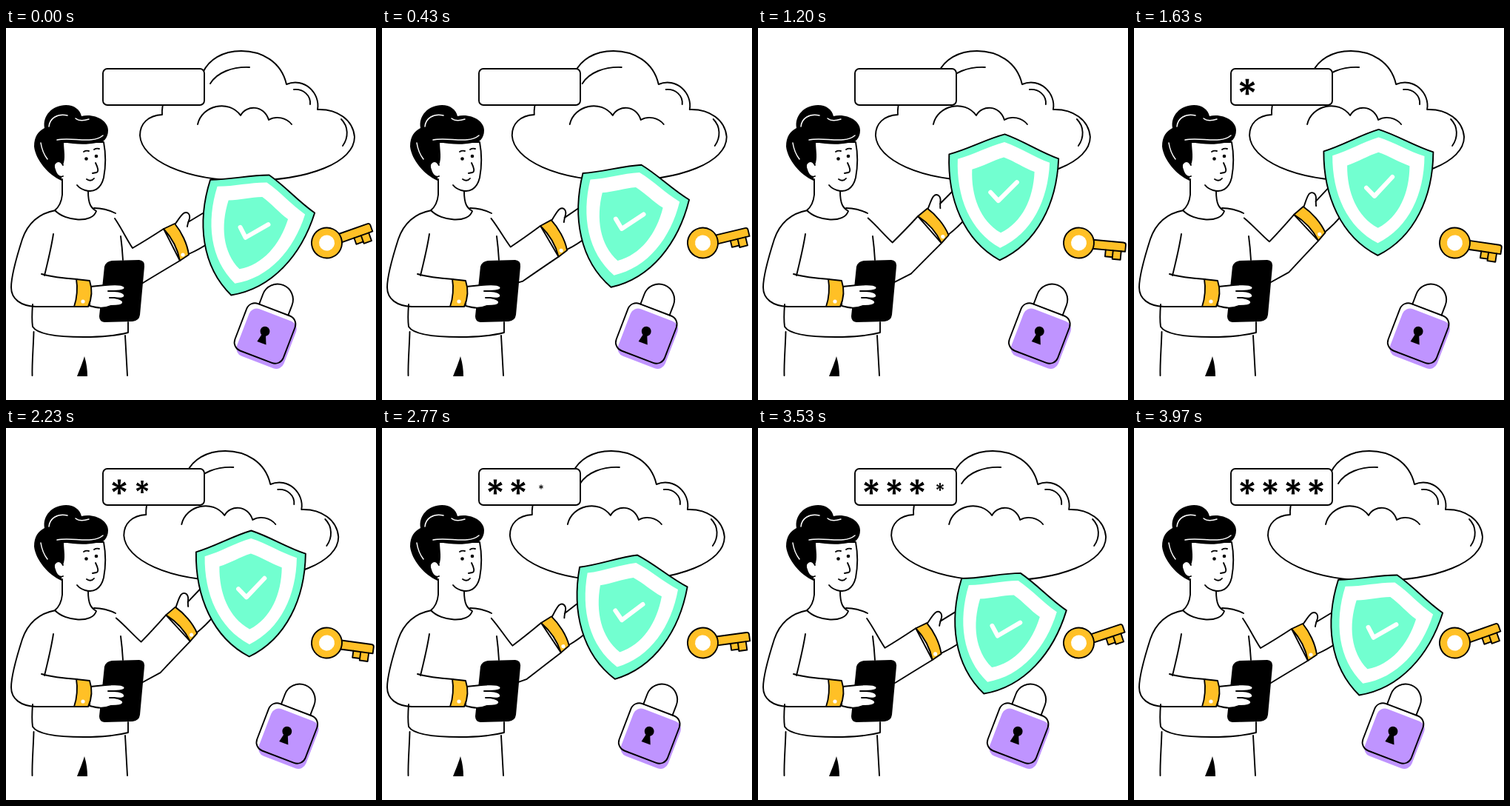
Recreate the animation shown at these times as an HTML page. Size 500 by 502 pixels, loop 4000 ms.

```html
<!DOCTYPE html>
<html>
<head>
<meta charset="utf-8">
<style>
html, body { margin: 0; width: 100%; height: 100%; overflow: hidden; background: #fff; }
svg { display: block; width: 500px; height: 502px; }
.line { fill: none; stroke: #000; stroke-width: 1.9; stroke-linecap: round; stroke-linejoin: round; }
.white { fill: #fff; }
.gold { fill: #ffc026; }
.teal { fill: #72ffd0; }
.bare { stroke: none; }
.strand { stroke: #fff; stroke-width: 1.5; }
</style>
</head>
<body>
<svg viewBox="0 0 500 502">
  <defs>
    <path id="crest" d="M-74-55C-48-63-26-77 0-85C26-77 48-63 74-55C74 5 50 60 0 85C-50 60-74 5-74-55Z"/>
    <path id="star" d="M-2.3-10H2.3L1.5-2.6L7.5-7L9.8-3L3 0L9.8 3L7.5 7L1.5 2.6L2.3 10H-2.3L-1.5 2.6L-7.5 7L-9.8 3L-3 0L-9.8-3L-7.5-7L-1.5-2.6Z"/>
  </defs>

  <g id="cloud" class="line">
    <path d="M211 117C192 118 181 129 181 145C183 178 241 206 325 206C410 206 471 181 471 147C469 124 448 109 421 110C425 88 403 66 379 76C372 45 345 31 318 31C292 31 274 43 266 60C240 62 209 85 211 117Z"/>
    <path d="M276 75C285 60 306 52 329 53M389 83C402 82 412 91 411 103M453 123C463 133 463 148 455 159"/>
    <path d="M259 130C265 104 301 96 317 118C325 103 349 104 355 124M355 124C365 118 379 121 386 130"/>
  </g>

  <g id="arm" class="line">
    <path class="white" d="M147 257C156 270 163 285 171 297Q190 286 213 271L235 314Q208 330 185 344L150 352"/>
    <path class="white" d="M229 264C232 260 236 253 240 250C245 247 249 251 248 257C246 263 245 266 245 268M246 262L266 250M247 305C256 301 264 297 274 290"/>
    <path class="gold" d="M213 271L228 264C237 275 245 291 247 306L235 314C232 298 224 283 213 271Z"/>
    <circle class="white bare" cx="239" cy="306" r="2.6"/>
  </g>

  <g class="line">
    <path d="M37.500 410C37 431 35 451 35.500 469M161 415L164 469"/>
    <path class="bare" d="M96 470C100 460 104 450 106 443C109 453 110 462 110 470Z" style="fill:#000"/>
    <path d="M36 373C35 386 35 396 36 403C42 413 70 417 105 417Q142 417 165 411V397"/>
    <path d="M67 246C45 250 30 262 22 285C14 310 7 335 7 350C7 366 20 375 40 376H92M64 278C61 298 56 317 52 334M48 332C65 337 80 338 96 339"/>
    <path d="M119 243C130 243 140 246 148 250M155 281Q157 296 158 313"/>
    <path d="M76 204V225C75 235 71 242 66 246C80 261 117 264 122 247C115 243 111 238 111 220"/>
    <path class="white" d="M77 154H132C135 170 135 186 132 202C128 218 118 222 107 219Q100 217 96 212"/>
  </g>

  <path d="M75 206C57 198 40 178 38 160C38 146 44 139 52 135C49 118 63 104 81 104C92 104 100 110 102 119C120 115 138 125 138 138C138 150 130 156 122 155C108 158 92 157 78 154C78 165 81 175 77 185C71 176 62 181 66 191Q69 198 75 200Z"/>
  <g class="line">
    <path class="white" d="M77 185C72 176 62 181 66 191C68 199 73 202 77 200"/>
    <path class="strand" d="M58 133C59 122 69 115 83 118M94 122C99 126 106 125 112 123M69 151C90 147 117 157 131 145M47 155Q49 168 56 177"/>
    <path d="M105 167Q108 165 112 166M119 164Q122 162 126 163M121 182C124 188 126 194 122 195L117 196M109 204Q115 208 119 203"/>
  </g>
  <circle cx="108.500" cy="176.500" r="2.300"/>
  <circle cx="122" cy="173" r="2.300"/>

  <path d="M143 314L180 313Q188 314 187 322L181 387Q180 395 171 396L133 397Q126 396 126 389L133 322Q135 315 143 314Z"/>
  <g class="line">
    <path class="white" d="M114 349L134 347C144 346 157 346 160 349C162 353 157 355 146 355C154 355 161 358 160 362C159 365 152 365 146 364C154 365 159 368 158 371C157 375 148 375 142 375C132 379 124 378 113 375Z"/>
    <path d="M146 355L138 355M146 364H140"/>
    <path class="gold" d="M95 339L113 341C117 353 116 365 111 376H92C96 365 97 350 95 339Z"/>
    <circle class="white bare" cx="104" cy="369" r="2.600"/>
  </g>

  <g id="shield">
    <use href="#crest" class="line" style="fill:#72ffd0"/>
    <use href="#crest" class="white" transform="translate(0 -3) scale(.84)"/>
    <use href="#crest" class="teal" transform="translate(0 -3) scale(.57 .6)"/>
    <path class="line" d="M-16-6L-5 5L19-21" style="stroke:#fff;stroke-width:6"/>
  </g>

  <g id="key" class="line">
    <path class="gold" d="M19-6H60Q63.500-6 63.500-3V6H58V17.500H47V15H37V6H19Z"/>
    <path d="M37 6H58M47 6V15"/>
    <circle class="gold" r="20.500"/>
    <circle class="white bare" r="10.500"/>
  </g>

  <g id="lock">
    <rect x="-34" y="-34" width="68" height="68" rx="11" fill="#bf94ff" transform="translate(4.500 6)"/>
    <path class="line" d="M-21.500-34V-48.500a21 21 0 0 1 42 0V-34"/>
    <rect class="line" x="-35" y="-34" width="70" height="68" rx="12"/>
    <circle cx="-1" cy="-2.500" r="6.500"/>
    <path d="M-3 0L-6 14H7L1 0Z"/>
  </g>

  <rect class="line" x="131" y="55" width="137" height="49" rx="6" style="fill:#fff"/>
  <g id="code">
    <use href="#star"/>
    <use href="#star"/>
    <use href="#star"/>
    <use href="#star"/>
  </g>
</svg>
<script>
const LOOP = 4000;
const el = id => document.getElementById(id);
const place = (node, value) => node.setAttribute('transform', value);
const [cloud, arm, shield, key, lock] = ['cloud', 'arm', 'shield', 'key', 'lock'].map(el);
const stars = [...el('code').children];

// Cubic Bezier easing, solved by bisection
function bezier(x1, y1, x2, y2) {
  const at = (a, b, u) => 3 * a * u * (1 - u) ** 2 + 3 * b * u * u * (1 - u) + u ** 3;
  return x => {
    let lo = 0, hi = 1;
    for (let i = 0; i < 24; i++) {
      const mid = (lo + hi) / 2;
      if (at(x1, x2, mid) < x) lo = mid; else hi = mid;
    }
    return at(y1, y2, lo);
  };
}

const quick = bezier(.22, .12, .25, 1);
const soft = bezier(.33, 0, .25, 1);
const swing = (t, rise, fall) => t < .5 ? rise(t * 2) : 1 - fall(t * 2 - 1);

// Grow past full size, then settle
function pop(ms) {
  if (ms <= 0) return .001;
  if (ms < 440) return 1.15 * Math.sin(ms / 440 * Math.PI / 2);
  return 1.15 - .15 * Math.min(1, (ms - 440) / 140);
}

function draw(now) {
  const ms = now % LOOP, t = ms / LOOP;
  const drift = swing(t, soft, quick);
  const lift = swing(t, soft, soft);
  place(cloud, `translate(${-25.5 * drift} 0)`);
  place(lock, `translate(${350 + 35 * drift} 412) rotate(21)`);
  place(arm, `rotate(${-16.3 * lift} 146 250)`);
  place(shield, `translate(330 ${279.5 - 59 * lift}) rotate(${17.6 * (1 - lift)})`);
  place(key, `translate(433.5 290) rotate(${-19.5 + 28.5 * lift})`);
  stars.forEach((star, i) =>
    place(star, `translate(${153 + 31 * i} 79.5) scale(${pop(ms - 1300 - 700 * i)})`));
}

const start = performance.now();
function tick() {
  draw(performance.now() - start);
  requestAnimationFrame(tick);
}
tick();
</script>
</body>
</html>
```
